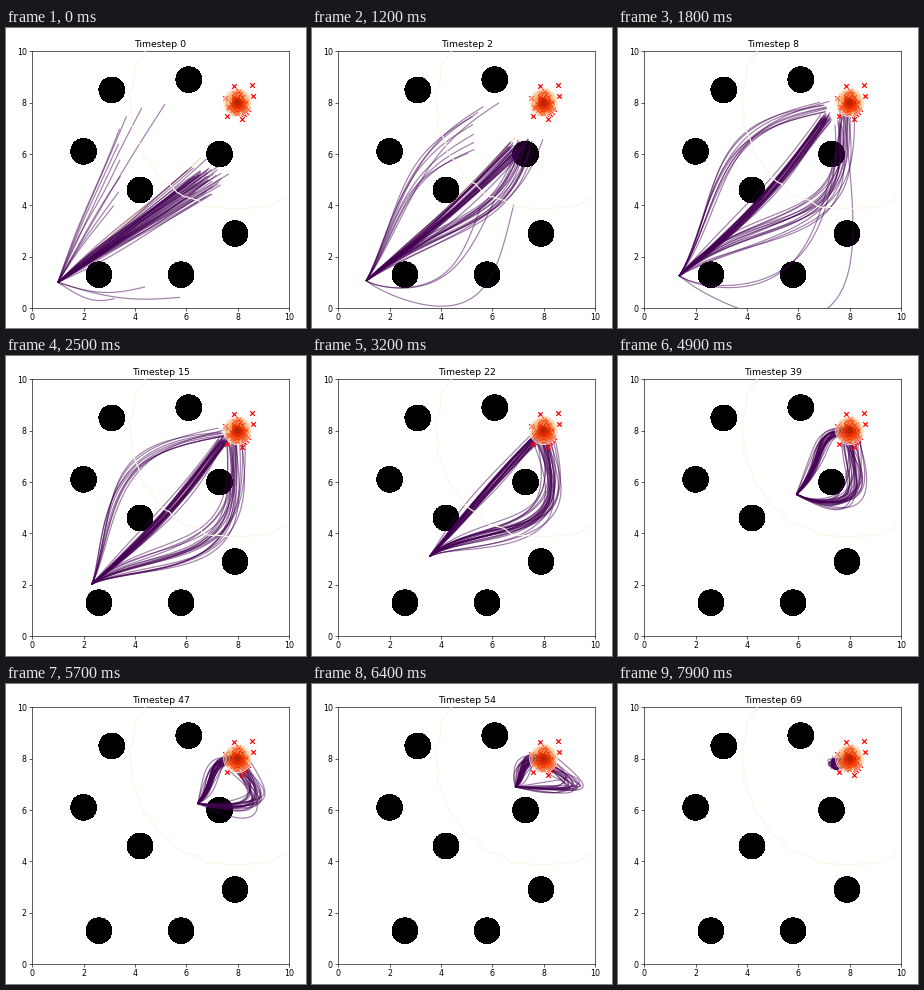
Recreate the animation shown at these times as a matplotlib script. Size 300x300 px, loop 8 s.

```python
import numpy as np
import matplotlib.pyplot as plt
from matplotlib.animation import FuncAnimation
from matplotlib.collections import LineCollection
from matplotlib.patches import Circle

rng = np.random.default_rng(7)
PURPLE, GOLD = "#440154", "#e0b060"
GOAL = np.array([8.0, 8.0])

# The robot's way, and how each class of paths bows out around the obstacles:
# sideways bulge, skew of the bulge along the path, forward lean
TIMES = [0, 8, 15, 29, 39, 54, 69]
ROBOT_X = [1, 1.36, 2.32, 4.8, 5.93, 6.9, 7.45]
ROBOT_Y = [1, 1.25, 2.02, 4.18, 5.52, 6.9, 7.6]
CENTER = ([-0.35, -0.3, 0.42, 0.5, 0.37, 0.2], [1, 1, 2.5, 2.5, 1.6, 1], [0] * 6)
RIGHT = ([-1.75, -2, -2.05, -1.6, -1.55, -0.15], [1.8, 1.4, 1.5, 0.65, 1, 1],
         [0, 0, 0.4, 0.2, 0.8, 0])
LEFT = ([1.5, 1.75, 1.75, 1, 1, 1], [1.4, 1.2, 1.2, 1, 1, 1], [0] * 6)
SHAPES = {"center": CENTER, "right": RIGHT, "left": LEFT, "low": RIGHT, "wide": RIGHT}
SPREAD = {"center": 0.1, "right": 0.19, "left": 0.12, "low": 0.12, "wide": 0.05}
DETOUR = {"low": 0.8, "wide": 3.2}

GROUPS = ["center"] * 32 + ["right"] * 16 + ["left"] * 9 + ["low"] * 2 + ["wide"]
N = len(GROUPS)
S = np.linspace(0, 1, 70)
BUMPS = np.array([np.sin(np.pi * S), 1.1 * S, 0.4 * np.sin(2 * np.pi * S)])
NOISE = np.clip(rng.normal(0, 1, (N, 3, 2)), -1.9, 1.9)
PHASE = rng.uniform(0, 2 * np.pi, (N, 3, 2))
LEAVE_LEFT = rng.integers(17, 22, N)
LEAVE_RIGHT = rng.integers(43, 53, N)


def make_fan():
    """First guess: nearly straight rays, most of them in one bundle."""
    angle = rng.normal(36, 3.0, N)
    length = rng.normal(7.1, 0.38, N)
    bend = rng.normal(0, 0.07, N)
    u = np.linspace(0, 1, 9)
    angle[0] = 41
    angle[-12:-3] = 54 + 5 * u + 11 * np.sin(np.pi * u ** 1.5)
    length[-12:-3] = 3.7 + 4.4 * u
    bend[-12:-3] = 0.12
    angle[-3:] = -16, -3, -7
    length[-3:] = 2.3, 3.4, 4.8
    bend[-3:] = -0.3
    angle = np.radians(angle)[:, None]
    x = 1 + length[:, None] * np.cos(angle) * S
    y = 1 + length[:, None] * np.sin(angle) * S + bend[:, None] * np.sin(np.pi * S)
    y += rng.normal(0, 0.05, (N, 1)) * np.sin(2 * np.pi * S)
    return np.stack([x, y], axis=2)


FAN = make_fan()


def mode_of(i, t):
    mode = GROUPS[i]
    if mode == "left" and t >= LEAVE_LEFT[i]:
        return "right"
    if mode == "right" and i >= 38 and t >= LEAVE_RIGHT[i]:
        return "center"
    return mode


def path_end(mode, t):
    gap = 0.9 * np.clip((24 - t) / 16, 0, 1)
    back = {"center": (1, 0.6), "left": (1, 0.2)}.get(mode, (0.2, 0.5))
    late = np.clip((t - 56) / 13, 0, 1)
    return GOAL - gap * np.array(back) - late * np.array([0.4, 0.05])


def mode_path(mode, t, start):
    t = max(t, TIMES[1])
    bulge, skew, lean = (np.interp(t, TIMES[1:], v) for v in SHAPES[mode])
    if mode in DETOUR:
        decay = np.clip((20 - t) / 12, 0, 1) ** 2
        bulge -= DETOUR[mode] * decay
        skew *= 1 - 0.6 * decay
    chord = path_end(mode, t) - start
    ahead = chord / np.hypot(*chord)
    side = np.array([-ahead[1], ahead[0]])
    bow = np.sin(np.pi * S ** skew)
    return start + np.outer(S, chord) + np.outer(bow, bulge * side + lean * ahead)


def paths(t):
    start = np.array([np.interp(t, TIMES, ROBOT_X), np.interp(t, TIMES, ROBOT_Y)])
    curves = {m: mode_path(m, t, start) for m in SHAPES}
    mix = min(t / TIMES[1], 1) ** 0.5
    scale = mix * np.interp(t, [54, 69], [1, 0.6])
    wobble = NOISE + 0.25 * np.sin(0.5 * t + PHASE)
    out = []
    for i in range(N):
        mode = mode_of(i, t)
        fan = FAN[i] + start - FAN[i][0]
        curve = fan * (1 - mix) + curves[mode] * mix
        out.append(curve + scale * SPREAD[mode] * (BUMPS.T @ wobble[i]))
    return out


fig = plt.figure(figsize=(16 / 3, 16 / 3), dpi=56.25, facecolor="white")
ax = fig.add_axes([26.2 / 300, 20 / 300, 256.7 / 300, 256.6 / 300])
ax.set(xlim=(0, 10), ylim=(0, 10), xticks=range(0, 11, 2), yticks=range(0, 11, 2))
title = ax.set_title("Timestep 0")

for c in [(3.1, 8.5), (6.1, 8.9), (2, 6.1), (7.3, 6), (4.2, 4.6),
          (7.9, 2.9), (2.6, 1.3), (5.8, 1.3)]:
    ax.add_patch(Circle(c, 0.5, fc="black", ec="none", antialiased=False, zorder=1))

bundle = LineCollection([], colors=[GOLD] + [PURPLE] * (N - 1), alpha=0.5,
                        linewidths=1.5, zorder=2)
ax.add_collection(bundle)

# Goal samples and the contours of their density
samples = np.vstack([
    rng.normal(GOAL, 0.18, (60, 2)),
    [(7.85, 8.67), (8.55, 8.7), (8.62, 8.28), (8.17, 7.38), (7.57, 7.5), (7.5, 8.2)]])
ax.scatter(*samples.T, marker="x", color="red", zorder=3)
oranges = plt.get_cmap("Oranges")
for r, shade in zip(np.linspace(0.54, 0.05, 10), np.linspace(0.04, 0.85, 10) ** 0.6):
    ax.add_patch(Circle(GOAL, r, fill=False, ec=oranges(shade), lw=1.2, zorder=4))
theta = np.radians(np.arange(140, 310, 1.5))
rim = 4.17 + 0.04 * np.sin(23 * theta) + rng.normal(0, 0.02, theta.size)
ax.plot(8 + rim * np.cos(theta), np.maximum(8 + rim * np.sin(theta), 3.88),
        color="#fbf6ea", lw=1.5, zorder=4)


def draw(frame):
    t = max(frame - 10, 0)
    title.set_text(f"Timestep {t}")
    bundle.set_segments(paths(t))
    return bundle, title


anim = FuncAnimation(fig, draw, frames=80, interval=100, repeat=True,
                     repeat_delay=0, blit=False)
plt.show()
```
